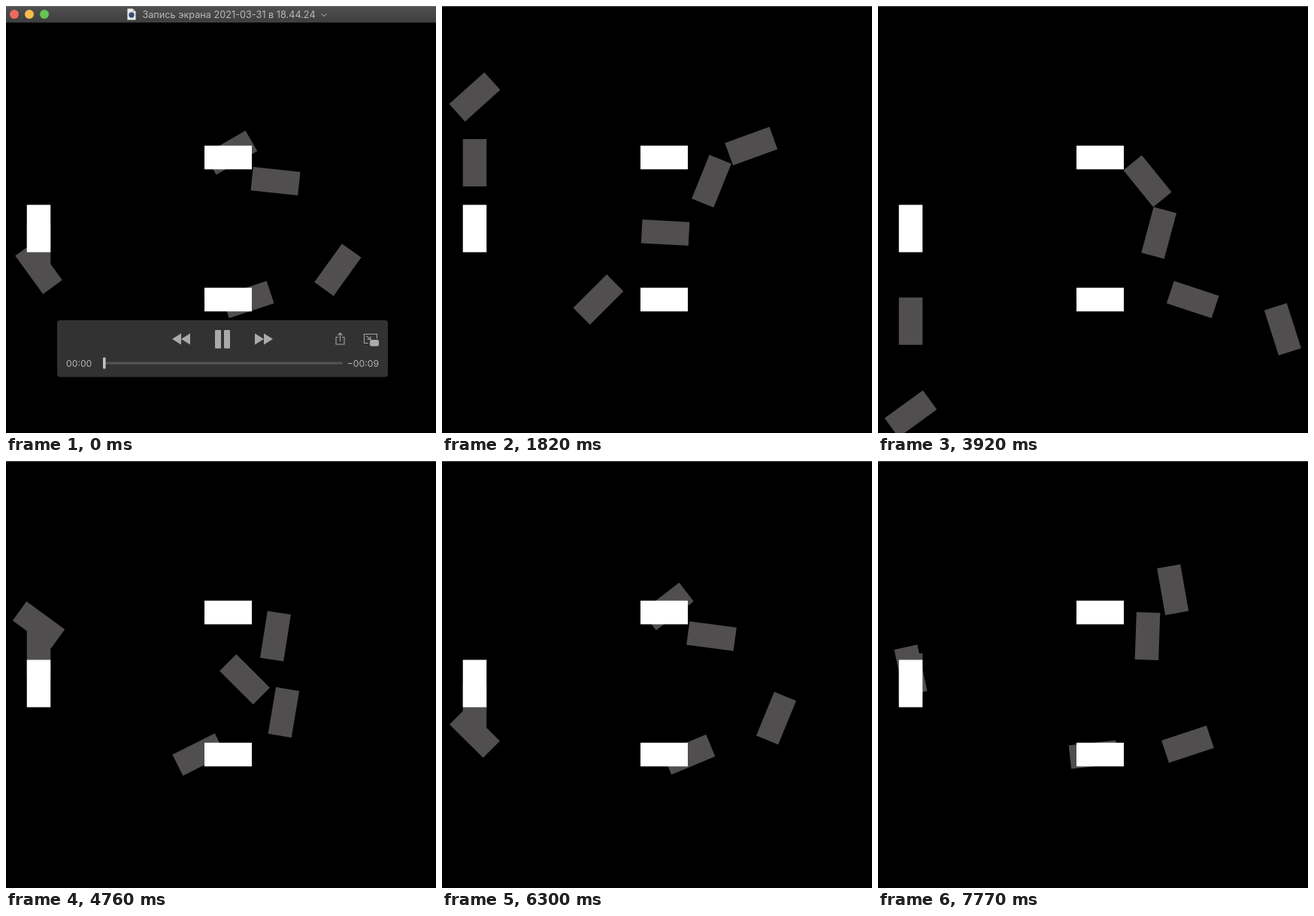
An HTML page for the animation above (7.84 s loop, 572 by 568 pixels).

```html
<!DOCTYPE html>
<html lang="ru">
<head>
<meta charset="utf-8">
<title>Вращение прямоугольников</title>
<style>
  @property --a { syntax: "<angle>"; inherits: true; initial-value: 186deg; }

  html, body { margin: 0; width: 100%; height: 100%; overflow: hidden; background: #000; }

  svg {
    display: block;
    width: 572px;
    height: 568px;
    animation: sweep 7.84s infinite;
  }
  text { font-family: Inter, "Open Sans", sans-serif; }

  /* One angle drives every part; it advances about 4deg each 70 ms. */
  @keyframes sweep {
    0%      { --a: 186deg; animation-timing-function: steps(26); }
    23.214% { --a: 292deg; animation-timing-function: steps(17); }
    38.392% { --a: 359deg; animation-timing-function: steps(25); }
    60.714% { --a: 459deg; animation-timing-function: steps(13); }
    72.321% { --a: 512deg; animation-timing-function: steps(19); }
    89.285% { --a: 587deg; animation-timing-function: steps(11); }
    99.107% { --a: 632deg; animation-timing-function: steps(1); }
    100%    { --a: 636deg; }
  }

  .turn  { transform: rotate(var(--a)); }
  .spin  { transform: rotate(calc(var(--a) * -6)); }
  .swing { transform: translateX(calc(126px * sin(var(--a) * 2))) rotate(calc(-45deg * sin(var(--a) * 4))); }
  .slide { transform: translateY(calc(126px * sin(var(--a) * 2))); }

  .child { fill: #504e4f; }
  .base  { fill: #fff; }

  .chrome { animation: hide 7.84s linear infinite; }
  .head   { animation: seek 7.84s steps(112) infinite; }
  .early  { animation: early 7.84s step-end infinite; }
  .late   { animation: late 7.84s step-end infinite; }
  @keyframes hide  { 0%, 15% { opacity: 1; } 18%, 100% { opacity: 0; } }
  @keyframes seek  { to { transform: translateX(277px); } }
  @keyframes early { 0% { opacity: 1; } 13.39%, 100% { opacity: 0; } }
  @keyframes late  { 0% { opacity: 0; } 13.39%, 100% { opacity: 1; } }
</style>
</head>
<body>
<svg viewBox="0 0 572 568">
  <defs>
    <rect id="wide" x="-31.5" y="-15.75" width="63" height="31.5"/>
    <rect id="tall" x="-15.75" y="-31.5" width="31.5" height="63"/>
    <path id="skip" d="M0 -7.5 L12 0 L0 7.5Z M12 -7.5 L24 0 L12 7.5Z"/>
    <linearGradient id="bar" x2="0" y2="1">
      <stop offset="0" stop-color="#505050"/>
      <stop offset="1" stop-color="#3e3e3e"/>
    </linearGradient>
  </defs>

  <rect width="572" height="568"/>
  <rect width="572" height="1" fill="#4c4c4c"/>

  <g class="child">
    <g transform="translate(358.5 233)">
      <g class="turn">
        <use href="#wide"/>
        <g transform="translate(63 31.5)"><use href="#wide" class="spin"/></g>
      </g>
    </g>
    <g transform="translate(295.5 390.5)">
      <g class="swing">
        <use href="#wide"/>
        <g transform="translate(126 0)"><use href="#wide" class="spin"/></g>
      </g>
    </g>
    <g transform="translate(43.5 296)">
      <g class="slide">
        <use href="#tall"/>
        <g class="slide"><use href="#tall" class="spin"/></g>
      </g>
    </g>
  </g>

  <g class="base">
    <use href="#wide" transform="translate(295.5 201.5)"/>
    <use href="#wide" transform="translate(295.5 390.5)"/>
    <use href="#tall" transform="translate(43.5 296)"/>
  </g>

  <g class="chrome">
    <!-- Title bar -->
    <rect width="572" height="22" fill="url(#bar)"/>
    <rect width="572" height="1" fill="#666"/>
    <circle cx="11" cy="11" r="6" fill="#ed6a5f"/>
    <circle cx="31" cy="11" r="6" fill="#f5be4f"/>
    <circle cx="51" cy="11" r="6" fill="#62c554"/>
    <path d="M161.5 3.5h7l4 4v11h-11z" fill="#ececec"/>
    <path d="M168.5 3.5v4h4z" fill="#bbb"/>
    <circle cx="167" cy="12" r="3.7" fill="#34506f"/>
    <text x="296.5" y="16" font-size="12.7" text-anchor="middle" fill="#b8b8b8">Запись экрана 2021-03-31 в 18.44.24</text>
    <path d="M419.5 10.5l3.5 3 3.5-3" fill="none" stroke="#909090" stroke-width="1.3"/>

    <!-- Player controls -->
    <rect x="68" y="418" width="440" height="75.5" rx="4" fill="#323232"/>
    <g fill="#aaa">
      <use href="#skip" transform="translate(245 443) scale(-1 1)"/>
      <use href="#skip" transform="translate(331 443)"/>
      <rect x="278" y="431" width="8" height="24.5" rx="1"/>
      <rect x="290" y="431" width="8" height="24.5" rx="1"/>
      <rect x="484" y="444" width="12" height="8.5" rx="2"/>
    </g>
    <g fill="none" stroke="#a2a2a2" stroke-width="1.1">
      <path d="M442 440.5h-3v9.5h11v-9.5h-3M444.5 446v-11M441.5 438l3-3 3 3"/>
      <path d="M482 448.5h-5.5v-12h17v6M479.5 439l5 4M485 439.5v4h-4.5"/>
    </g>
    <rect x="130" y="473.5" width="318" height="3" rx="1.5" fill="#565656"/>
    <rect class="head" x="129" y="467.5" width="3.5" height="15" rx="1" fill="#c4c4c4"/>
    <g font-size="12.2" fill="#b4b4b4">
      <g class="early">
        <text x="80" y="479.5">00:00</text>
        <text x="496" y="479.5" text-anchor="end">−00:09</text>
      </g>
      <g class="late">
        <text x="80" y="479.5">00:01</text>
        <text x="496" y="479.5" text-anchor="end">−00:08</text>
      </g>
    </g>
  </g>
</svg>
</body>
</html>
```
